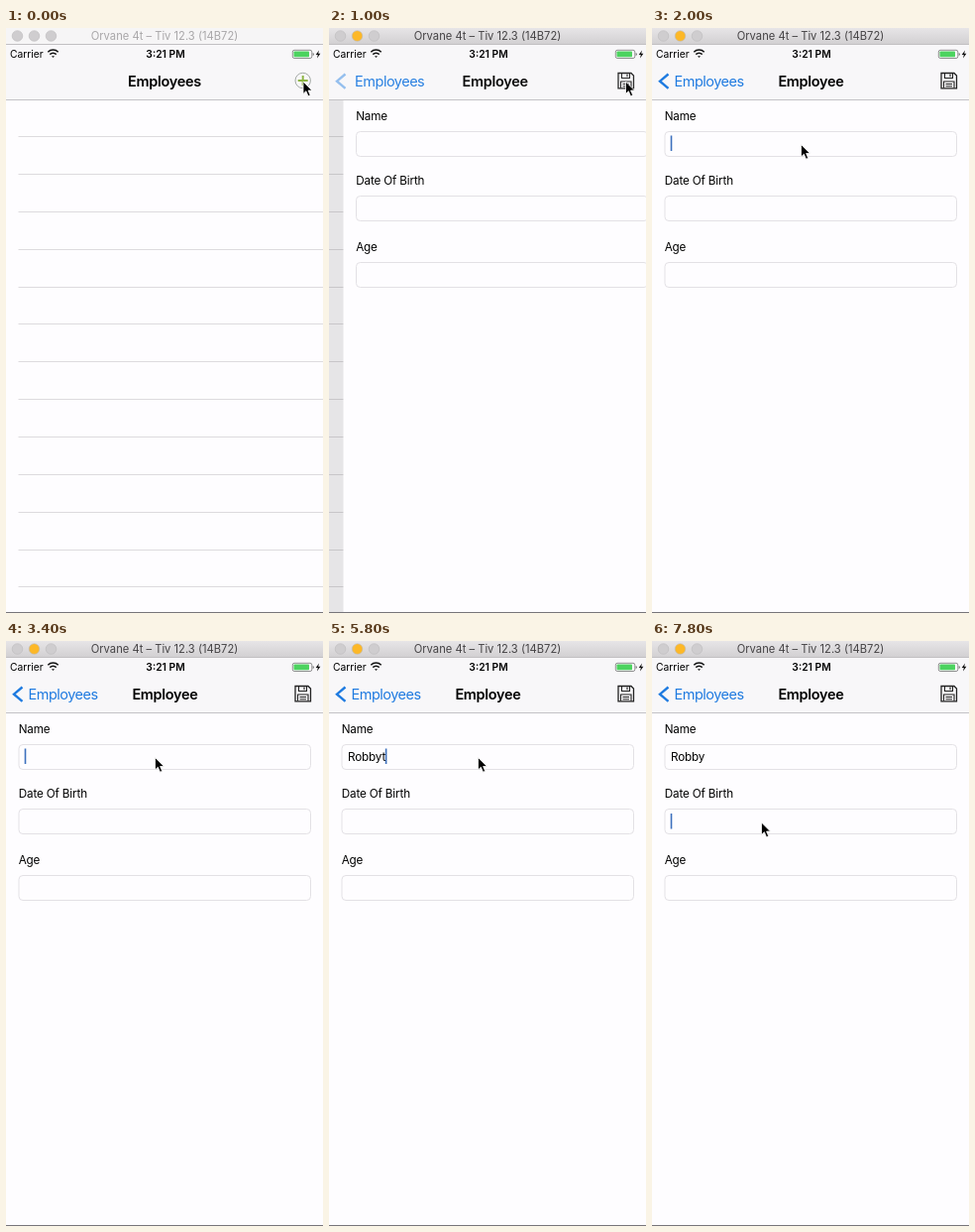
An HTML page for the animation above (8 s loop, 320 by 590 pixels).

```html
<!DOCTYPE html>
<html lang="en">
<head>
<meta charset="utf-8">
<title>Employee form</title>
<style>
  html, body { margin: 0; width: 100%; height: 100%; overflow: hidden; background: #fefdff; }
  svg { display: block; width: 320px; height: 590px; }
  text { font-family: Inter, "Open Sans", sans-serif; white-space: pre; }
  .nav { font-size: 14.5px; letter-spacing: -.3px; }
  .bold { font-weight: 600; }
  .mid { text-anchor: middle; }
  .status { font-size: 10.3px; }
  .back { fill: #1f7be0; letter-spacing: -.5px; }
  .body { font-size: 11.7px; letter-spacing: -.15px; }
  .field { fill: #fefdff; stroke: #e3e1e5; }
  .line { fill: none; stroke: #222; }
</style>
</head>
<body>
<svg viewBox="0 0 320 590">
  <defs>
    <linearGradient id="chrome" x2="0" y2="1">
      <stop stop-color="#e7e5e7"/><stop offset="1" stop-color="#d1cfd1"/>
    </linearGradient>
  </defs>
  <rect width="320" height="590" fill="#fefdff"/>

  <g id="list"></g>
  <rect id="dim" y="73" width="320" height="517"/>

  <g id="form">
    <rect y="73" width="320" height="517" fill="#fefdff"/>
    <g id="fields"></g>
    <rect id="selection" x="17" y="109" width="42" height="15" fill="#c0d7f1"/>
    <text id="name" class="body" x="19" y="121"></text>
    <g id="suggestion">
      <path d="M16.500 126.500H70.500a9 9 0 0 1 0 18H20.500a4 4 0 0 1-4-4z" fill="#fff" stroke="#cfcfd2"/>
      <text class="body" x="19" y="139.500" fill="#2470d0">Robby's</text>
      <path d="M66.700 132l6 6m0-6l-6 6" stroke="#aaa"/>
    </g>
    <rect id="caret" width="1.600" height="15.500" fill="#3d70bd"/>
  </g>

  <rect y="17" width="320" height="55" fill="#f8f7f9"/>
  <path d="M0 72.500H320" stroke="#c4c3c6"/>

  <text class="status" x="4" y="30">Carrier</text>
  <g class="line" stroke-width="1.500" style="stroke:#111">
    <path d="M42.300 24.300a7.300 7.300 0 0 1 10.400 0M44.300 26.600a4.500 4.500 0 0 1 6.400 0"/>
    <path d="M46 28.300h3l-1.500 1.700z" fill="#111" stroke="none"/>
  </g>
  <text class="status bold mid" x="161" y="30">3:21 PM</text>
  <rect x="289.300" y="22.300" width="19.500" height="8.200" rx="1.800" fill="none" stroke="#777" stroke-width=".8"/>
  <rect x="290.500" y="23.500" width="15.500" height="5.800" rx=".8" fill="#4cd35f"/>
  <path d="M309.600 25v3q1.300-.3 1.300-1.500t-1.300-1.500" fill="#777"/>
  <path d="M316 22.500l-3.300 4.600h2.100l-.8 3.400 3.400-4.700h-2.200z" fill="#111"/>

  <g id="listBar">
    <text id="listTitle" class="nav bold mid" x="160" y="58.500">Employees</text>
    <g id="plus" fill="none">
      <circle id="plusRing" cx="299.700" cy="53" r="7.700"/>
      <path id="plusSign" d="M294.700 53h10M299.700 48v10" stroke-width="2"/>
    </g>
  </g>
  <g id="formBar">
    <path id="chevron" d="M16.500 46.500L8 53.700l8.500 7.200" fill="none" stroke="#1f7be0" stroke-width="2.400"/>
    <text id="backLabel" class="nav back" x="22.500" y="58.500">Employees</text>
    <text id="formTitle" class="nav bold mid" x="160.500" y="58.500">Employee</text>
    <g id="save" class="line" stroke-width="1.300">
      <path d="M292 45.500h13l2.500 2.500v12.800h-15.500z"/>
      <path d="M295.500 45.500v5h8v-5M301 46.500v2.800M294.500 60.500v-6.500h10.500v6.500M296.500 56.500h6.500M296.500 58.700h6.500" stroke-width="1.100"/>
    </g>
  </g>

  <rect id="titleBar" width="320" height="17"/>
  <path d="M0 16.500H320" stroke="#c2c0c2"/>
  <g stroke-width=".6" stroke="#bdbbbd" fill="#cfcdcf">
    <circle cx="11.500" cy="8" r="5.300"/>
    <circle id="amber" cx="28.500" cy="8" r="5.300"/>
    <circle cx="45.500" cy="8" r="5.300"/>
  </g>
  <text id="windowTitle" class="mid" x="160" y="12" font-size="11.200">Orvane 4t – Tiv 12.3 (14B72)</text>

  <path d="M0 589.500H320" stroke="#77757a"/>
  <path id="pointer" d="M0 0V12.400L2.900 9.700L5 14.700L7.200 13.800L5.100 9H9z" fill="#000" stroke="#fff" stroke-width=".8"/>
</svg>
<script>
const LOOP = 8000, STEP = 200;
const $ = id => document.getElementById(id);
const set = (id, attrs) => {
  for (const key in attrs) $(id).setAttribute(key, attrs[key]);
};
const show = (id, on) => set(id, { opacity: +on });
const shift = (id, x, y = 0) => set(id, { transform: `translate(${x} ${y})` });

$('list').innerHTML = Array.from({ length: 13 }, (_, i) =>
  `<path d="M12.5 ${Math.floor(109.7 + 37.85 * i) + .5}H320" stroke="#dddbde"/>`).join('');

$('fields').innerHTML = [['Name', 104], ['Date Of Birth', 169], ['Age', 236]].map(([label, y]) =>
  `<text class="body" x="12.7" y="${y - 11}">${label}</text>
   <rect class="field" x="13" y="${y + .5}" width="294.5" height="25" rx="4"/>`).join('');

// Pointer way-points: time, x, y
const route = [
  [0, 300, 54], [1000, 299.5, 54], [1200, 236, 86], [1600, 150.5, 117.5],
  [6800, 150.5, 117.5], [7200, 116, 168], [7400, 110.5, 183]
];
const typing = [
  [3800, 'R'], [4200, 'Ro'], [4600, 'Rob'], [5000, 'Robb'],
  [5400, 'Robby'], [5800, 'Robbyt'], [6800, 'Robby']
];

function pointerAt(t) {
  const next = route.findIndex(point => point[0] > t);
  if (next < 0) return route[route.length - 1].slice(1);
  const [t0, x0, y0] = route[next - 1], [t1, x1, y1] = route[next];
  const k = (t - t0) / (t1 - t0);
  return [x0 + (x1 - x0) * k, y0 + (y1 - y0) * k];
}

// Distance the form still has to slide: critically damped spring
function slideAt(t) {
  if (t < 645) return 320;
  if (t >= 1200) return 0;
  const k = (t - 645) * .0137;
  return 320 * (1 + k) * Math.exp(-k);
}

function drawWindow(t) {
  const active = t >= 200, released = t >= 400;
  set('titleBar', { fill: active ? 'url(#chrome)' : '#f6f5f6' });
  set('windowTitle', { fill: active ? '#454345' : '#a9a7a9' });
  set('amber', { fill: active ? '#fdb827' : '#cfcdcf' });
  set('plusRing', { stroke: released ? '#48524c' : '#a4aaa6' });
  set('plusSign', { stroke: released ? '#35502e' : '#8eb545' });
}

function drawPush(t) {
  const x = slideAt(t), done = 1 - x / 320;
  shift('form', x);
  shift('list', -.3 * (320 - x));
  set('dim', { opacity: .1 * done });
  shift('listTitle', -102 * done);
  show('listBar', Math.max(0, 1 - done * 1.3));
  shift('backLabel', x * .25);
  shift('formTitle', x * .5);
  show('formBar', done);
  set('chevron', { opacity: t < 1200 ? done * .5 : 1 });
}

function drawEntry(t) {
  const typed = typing.filter(([at]) => at <= t).pop();
  const suggesting = t >= 6200 && t < 6800;
  const inDate = t >= 7600;
  $('name').textContent = typed ? typed[1] : '';
  show('selection', suggesting);
  show('suggestion', suggesting);

  const idle = t < 3800;
  const blinkOn = !idle || (t - 2000) % 1000 < 600;
  const width = typed && !inDate ? $('name').getComputedTextLength() : 0;
  set('caret', { x: 18.7 + width, y: inDate ? 174 : 108.5 });
  show('caret', t >= 1800 && blinkOn);
}

function frame(now) {
  const t = Math.floor(now % LOOP / STEP) * STEP;
  drawWindow(t);
  drawPush(t);
  drawEntry(t);
  shift('pointer', ...pointerAt(t));
  requestAnimationFrame(frame);
}
frame(0);
</script>
</body>
</html>
```
